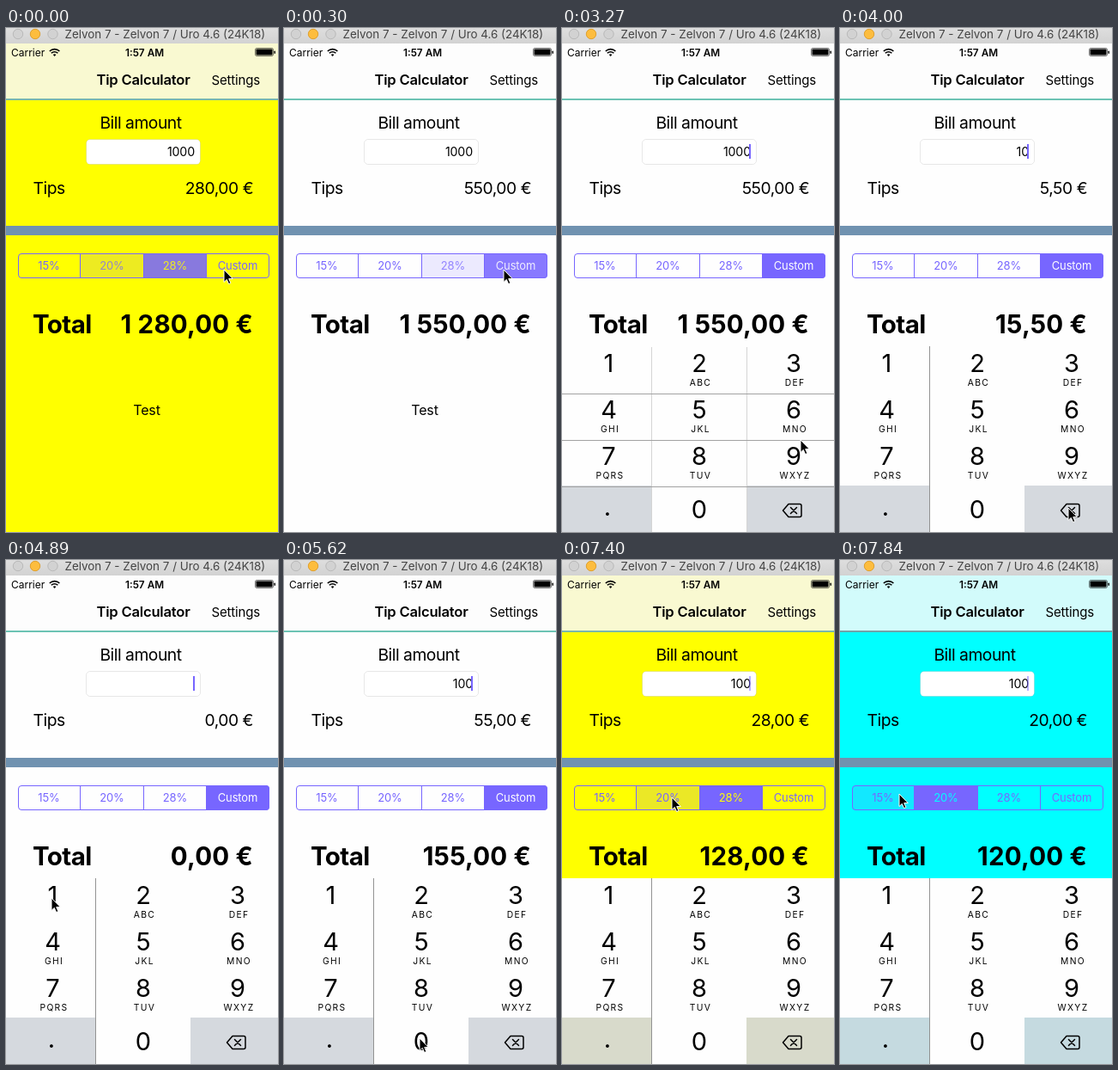
Recreate the animation shown at these times as an HTML page. Size 317x586 px, loop 7990 ms.

```html
<!DOCTYPE html>
<html lang="en">
<head>
<meta charset="utf-8">
<title>Tip Calculator</title>
<style>
  html, body { margin: 0; width: 100%; height: 100%; overflow: hidden; }
  svg {
    display: block; width: 317px; height: 586px;
    font-family: Inter, "Liberation Sans", sans-serif;
    --tint: #7766ff;
  }
  .mid { text-anchor: middle; }
  .end { text-anchor: end; }
  .body { font-size: 19.3px; letter-spacing: -.025em; }
  .small { font-size: 14.2px; letter-spacing: -.01em; }
  .big { font-size: 29.5px; font-weight: 700; }
  .seg { font-size: 13px; letter-spacing: -.01em; text-anchor: middle; }
  .digit { font-size: 29px; text-anchor: middle; }
  .letters { font-size: 10.3px; letter-spacing: 1.3px; text-anchor: middle; }
  .tint { fill: var(--tint); }
  .bg { fill: var(--bg); }
  .nav { fill: var(--nav); }
  .rule { fill: var(--rule); }
  .key { fill: var(--key); }
  .line { fill: none; stroke: var(--tint); }
</style>
</head>
<body>
<svg id="stage" viewBox="0 0 317 586">
  <defs>
    <linearGradient id="chrome" x2="0" y2="1">
      <stop offset="0" stop-color="#dedede"/><stop offset="1" stop-color="#d2d2d2"/>
    </linearGradient>
    <clipPath id="pill"><rect x="14" y="262" width="293" height="29" rx="4"/></clipPath>
  </defs>

  <rect class="bg" width="317" height="586"/>

  <!-- window bar -->
  <rect width="317" height="18" fill="url(#chrome)"/>
  <g fill="#d2d2d2" stroke="#b9b9b9">
    <circle cx="14" cy="7" r="5.7"/><circle cx="54.5" cy="7" r="5.7"/>
    <circle cx="34" cy="7" r="5.7" fill="#fdbd3e" stroke="#dfa02e"/>
  </g>
  <text x="68.5" y="12" font-size="13.4" fill="#444">Zelvon 7 - Zelvon 7 / Uro 4.6 (24K18)</text>

  <!-- status and navigation -->
  <rect class="nav" y="18" width="317" height="64"/>
  <rect class="rule" y="82" width="317" height="2"/>
  <text x="6" y="32.5" font-size="12">Carrier</text>
  <g fill="none" stroke="#000" stroke-width="1.6">
    <path d="M50.8 27a8.3 8.3 0 0 1 11.6 0M52.8 29.3a5.4 5.4 0 0 1 7.6 0"/>
    <path d="M54.8 31a2.7 2.7 0 0 1 3.6 0L56.6 33z" fill="#000" stroke="none"/>
  </g>
  <text class="mid" x="161.5" y="32.5" font-size="11.8" font-weight="600">1:57 AM</text>
  <rect x="290.5" y="23.5" width="21" height="9" rx="1.8" fill="none" stroke="#000" stroke-opacity=".55"/>
  <rect x="291.5" y="24.5" width="19" height="7" rx=".8"/>
  <rect x="312.5" y="26.5" width="1.4" height="3.4" rx=".7"/>
  <text class="mid" x="160" y="66" font-size="16.6" font-weight="600" letter-spacing="-.2">Tip Calculator</text>
  <text x="239.5" y="65.5" font-size="15" letter-spacing="-.15">Settings</text>

  <!-- bill and tips -->
  <text class="body mid" x="157" y="117">Bill amount</text>
  <rect x="93.5" y="129.5" width="133" height="29" rx="4.5" fill="#fff" stroke="#000" stroke-opacity=".09"/>
  <text class="small end" id="bill" x="220" y="149"></text>
  <rect class="tint" id="caret" x="218" y="135" width="2" height="17"/>
  <text class="body" x="31.5" y="193">Tips</text>
  <text class="body end" id="tips" x="288" y="193"></text>
  <rect y="230" width="317" height="11" fill="#7092b0"/>

  <!-- rate picker -->
  <g id="segments" clip-path="url(#pill)"></g>
  <rect class="line" x="14.5" y="262.5" width="292" height="28" rx="3.5"/>
  <path class="line" d="M86.5 262v29M160.5 262v29M233.5 262v29"/>

  <text class="big" x="31" y="355" letter-spacing="-.6">Total</text>
  <text class="big end" id="total" x="288" y="355" letter-spacing=".2"></text>
  <text class="mid" x="164" y="450" font-size="16" letter-spacing="-.1">Test</text>

  <g id="keyboard">
    <rect y="370" width="317" height="216" fill="#fefefe"/>
    <path class="key" d="M0 532h104v54H0zM215 532h102v54H215z"/>
    <g id="grid" fill="none">
      <path stroke="#d4d4d4" d="M104.5 371v215M215.5 371v215"/>
      <path stroke="#a2a2a2" d="M0 425.5h317M0 479.5h317M0 533.5h317"/>
    </g>
    <path id="divider" stroke="#929292" d="M104.5 370v216"/>
    <g id="keys"></g>
    <g fill="none" stroke="#000" stroke-width="1.5" stroke-linejoin="round" stroke-linecap="round">
      <path d="M257.5 561l6.500-7.500h13q2 0 2 2v11q0 2-2 2h-13z"/>
      <path d="M266.5 557.5l7 7m0-7l-7 7"/>
    </g>
  </g>

  <path id="cursor" d="M0 0V14.500L3.300 11.400 5.600 16.600 7.900 15.600 5.700 10.600H10.300Z" stroke="#fff"/>
</svg>
<script>
const LOOP = 7990, TICKS = 54;
const $ = id => document.getElementById(id);

const white = { bg: '#fefefe', nav: '#fdfdfd', rule: '#6cc3b4', key: '#d5d9de' };
const yellow = { bg: '#ffff00', nav: '#f9f9d1', rule: '#7ab8ac', key: '#d8dacb' };
const cyan = { bg: '#00ffff', nav: '#d2fbfb', rule: '#70a3a8', key: '#c5dae0' };

const options = [
  { label: '15%', rate: .15, theme: white, x: 14, mid: 50 },
  { label: '20%', rate: .2, theme: cyan, x: 86.5, mid: 123.5 },
  { label: '28%', rate: .28, theme: yellow, x: 160.5, mid: 197 },
  { label: 'Custom', rate: .55, theme: white, x: 233.5, mid: 270 }
];

// Timelines, in ticks: [start, value]
const picks = [[-1, 1], [0, 2], [2, 3], [47, 2], [51, 1]];
const presses = [[0, -1], [1, 3], [2, -1], [45, 2], [47, -1], [50, 1], [51, -1], [53, 0]];
const bills = [[0, '1000'], [25, '100'], [26, '10'], [28, '1'], [29, ''], [34, '1'], [37, '10'], [38, '100']];
const carets = [[0, 0], [19, 1], [44, 0], [50, .5], [51, 1], [53, .5]];
const path = [
  [0, 254, 281], [2, 256, 281], [3, 179, 168], [4, 179, 168], [6, 182, 146], [8, 186, 154],
  [10, 186, 154], [11, 263, 158], [14, 240, 338], [16, 205, 300], [18, 200, 154], [19, 200, 154],
  [22, 278, 479], [24, 266, 558], [29, 266, 558], [33, 53, 393], [34, 53, 393], [36, 158, 556],
  [39, 158, 556], [46, 210, 274], [48, 208, 274], [49, 208, 274], [50, 128, 276], [51, 126, 276],
  [53, 69, 272]
];

const current = (list, n) => list.filter(e => e[0] <= n).pop();

function along(n) {
  const i = path.findIndex(p => p[0] >= n);
  if (i <= 0) return path[0].slice(1);
  const [t0, x0, y0] = path[i - 1], [t1, x1, y1] = path[i];
  const u = (n - t0) / (t1 - t0);
  return [x0 + (x1 - x0) * u, y0 + (y1 - y0) * u];
}

function money(v) {
  const [whole, cents] = v.toFixed(2).split('.');
  return whole.replace(/\B(?=(\d{3})+$)/g, ' ') + ',' + cents + ' €';
}

$('segments').innerHTML = options.map((o, i) => {
  const right = i < 3 ? options[i + 1].x : 307;
  return `<rect class="tint" x="${o.x}" y="262" width="${right - o.x}" height="29"/>
    <text class="seg tint" x="${o.mid}" y="281">${o.label}</text>
    <text class="seg bg" x="${o.mid}" y="281">${o.label}</text>`;
}).join('');
const fills = $('segments').querySelectorAll('rect');
const plain = $('segments').querySelectorAll('text.tint');
const chosen = $('segments').querySelectorAll('text.bg');

const letters = ['', 'ABC', 'DEF', 'GHI', 'JKL', 'MNO', 'PQRS', 'TUV', 'WXYZ'];
const columns = [54.5, 160, 270];
$('keys').innerHTML = letters.map((s, i) => {
  const x = columns[i % 3], y = 400 + 54 * Math.floor(i / 3);
  return `<text class="digit" x="${x}" y="${y}">${i + 1}</text>
    <text class="letters" x="${x + 1.5}" y="${y + 16}">${s}</text>`;
}).join('') + '<text class="digit" x="160" y="570">0</text><text class="digit" x="53" y="567">.</text>';

function draw(n) {
  const [since, pick] = current(picks, n);
  const before = current(picks, since - 1);
  const mix = n === since ? .87 : 1;
  const pressed = current(presses, n)[1];
  const { rate, theme } = options[pick];
  for (const k in theme) $('stage').style.setProperty('--' + k, theme[k]);

  options.forEach((o, i) => {
    const on = i === pick ? mix : before && i === before[1] ? 1 - mix : 0;
    fills[i].style.opacity = i === pressed ? .15 : on;
    plain[i].style.opacity = 1 - on;
    chosen[i].style.opacity = on;
  });

  const bill = current(bills, n)[1];
  $('bill').textContent = bill;
  $('tips').textContent = money(bill * rate);
  $('total').textContent = money(bill * (1 + rate));
  $('caret').style.opacity = current(carets, n)[1];

  const rise = Math.min(1, Math.max(0, (n - 18.5) / 2.5));
  $('keyboard').setAttribute('transform', `translate(0 ${216 * (1 - rise) ** 2})`);
  $('grid').style.opacity = n < 26 ? 1 : 0;
  $('divider').style.opacity = n < 26 ? 0 : 1;
  $('cursor').setAttribute('transform', `translate(${along(n)})`);
}

const start = performance.now();
let last = -1;
function frame() {
  const t = (performance.now() - start) % LOOP;
  // The screen refreshes in even, coarse ticks
  const n = Math.min(TICKS - 1, Math.floor((t + 8) * TICKS / LOOP));
  if (n !== last) draw(last = n);
  requestAnimationFrame(frame);
}
frame();
</script>
</body>
</html>
```
